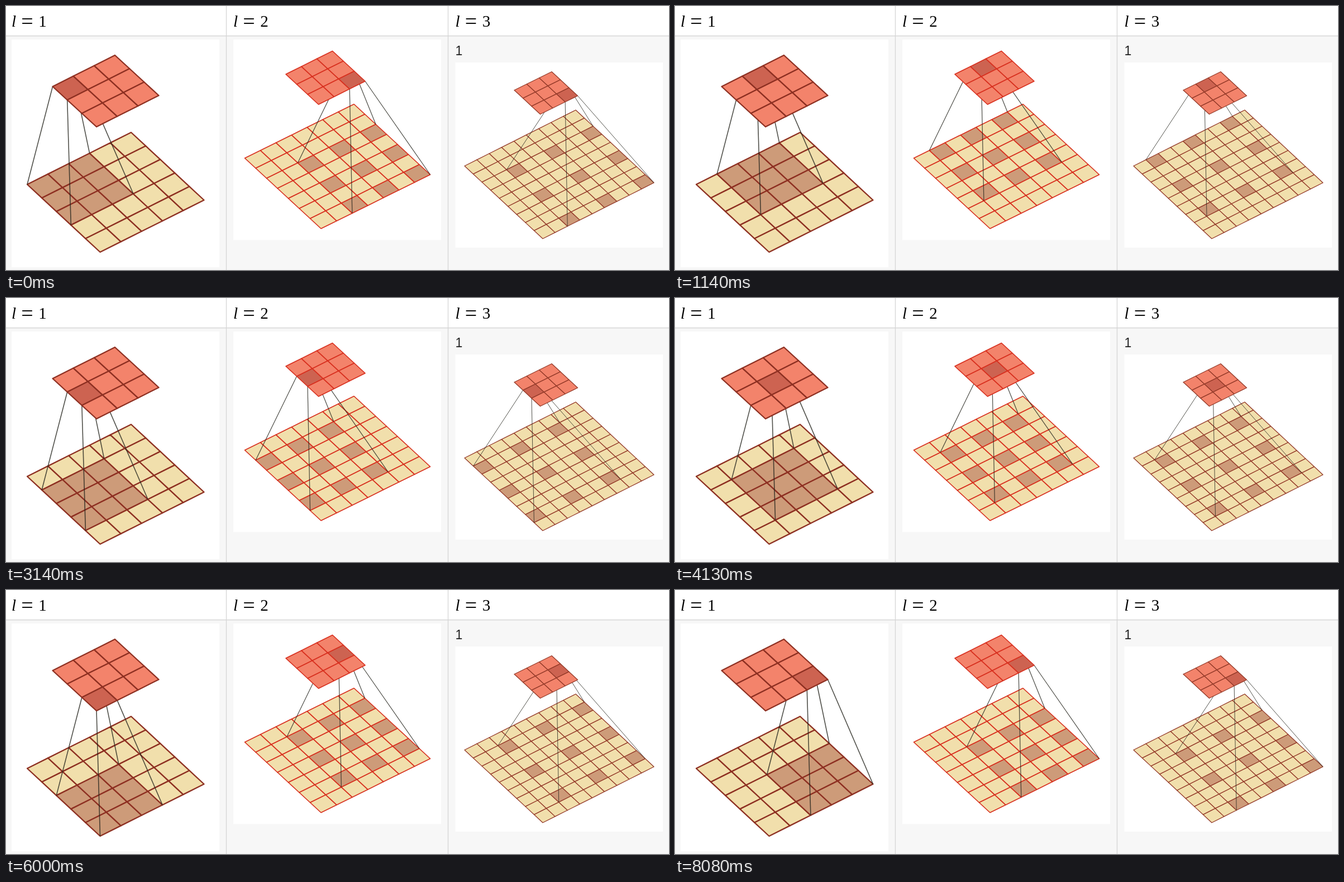
Recreate the animation shown at these times as an HTML page. Size 1187 by 472 pixels, loop 9.01 s.

```html
<!DOCTYPE html>
<html lang="en">
<head>
<meta charset="utf-8">
<title>Dilated convolutions</title>
<style>
  html, body { margin: 0; width: 100%; height: 100%; overflow: hidden; background: #f7f7f7; }
  svg { display: block; width: 100%; height: 100%; }
  .math { font: 29px "Liberation Serif", serif; text-anchor: middle; }
  .letter { font-style: italic; }
  .equals { font-size: 38px; }
  .note { font: 23px "Liberation Sans", sans-serif; fill: #222; }
  .rule { stroke: #d5d5d5; stroke-width: 1.3; }
  .ray { stroke: #26261f; stroke-opacity: .8; }
</style>
</head>
<body>
<svg id="stage" viewBox="0 0 1187 472"></svg>
<script>
const LOOP = 9010;
const COLORS = { base: '#f1dfac', patch: '#cd9b79', top: '#f3836b', active: '#cd6351' };

// Planes are given by their left, top and bottom corners.
const panels = [
  {
    dilation: 1, x: 10, card: [10, 60, 372, 407],
    base: [[38, 319], [224, 226], [168.5, 440]],
    top: [[83.5, 144], [195, 88], [162, 216]],
    edge: '#8e3022', edgeWidth: 2.3, rayWidth: 1.6,
    starts: [0, 1000, 2000, 3000, 4000, 5000, 6000, 7000, 8010]
  },
  {
    dilation: 2, x: 407, card: [407, 60, 372, 358.5],
    base: [[427.5, 272], [623, 175.5], [564, 398]],
    top: [[501, 122], [584.5, 80.5], [559.5, 176]],
    edge: '#d8301f', edgeWidth: 1.7, rayWidth: 1.25,
    starts: [70, 1070, 2070, 3070, 4070, 5070, 6070, 7070, 8080]
  },
  {
    dilation: 3, x: 804.5, card: [804.5, 101, 371.5, 331],
    base: [[821, 286], [1020, 186], [961, 416]],
    top: [[910, 150.5], [977, 117.5], [956.5, 193.5]],
    edge: '#943a29', edgeWidth: 1.3, rayWidth: 1,
    starts: [140, 1140, 2130, 3140, 4130, 5070, 6070, 7070, 8080]
  }
];

function gridPoint([origin, uEnd, vEnd], size, col, row) {
  return [0, 1].map(k => origin[k]
    + (uEnd[k] - origin[k]) * col / size
    + (vEnd[k] - origin[k]) * row / size);
}

function corners(plane, size, col, row, span) {
  return [[0, 0], [span, 0], [span, span], [0, span]]
    .map(([dc, dr]) => gridPoint(plane, size, col + dc, row + dr));
}

function grid(plane, size, fillFor) {
  let cells = '';
  for (let row = 0; row < size; row++) {
    for (let col = 0; col < size; col++) {
      cells += `<polygon points="${corners(plane, size, col, row, 1).join(' ')}" fill="${fillFor(col, row)}"/>`;
    }
  }
  return cells;
}

function drawPanel({ dilation, base, top, edge, edgeWidth, rayWidth }, step) {
  const col = step % 3, row = Math.floor(step / 3);
  const size = 2 * dilation + 3, span = 2 * dilation + 1;
  const sampled = (i, start) => i >= start && i < start + span && (i - start) % dilation === 0;

  const baseCells = grid(base, size, (c, r) =>
    sampled(c, col) && sampled(r, row) ? COLORS.patch : COLORS.base);
  const topCells = grid(top, 3, (c, r) =>
    c === col && r === row ? COLORS.active : COLORS.top);

  const ends = corners(base, size, col, row, span);
  const rays = corners(top, 3, col, row, 1).map(([x, y], i) =>
    `<line class="ray" stroke-width="${rayWidth}" x1="${x}" y1="${y}" x2="${ends[i][0]}" y2="${ends[i][1]}"/>`).join('');

  return `<g stroke="${edge}" stroke-width="${edgeWidth}" stroke-linejoin="round">${baseCells}${rays}${topCells}</g>`;
}

function drawFrame() {
  const cards = panels.map(({ dilation, x, card: [left, y, w, h] }) => `
    <text class="math letter" x="${x + 4}" y="36.5">l</text>
    <text class="math equals" x="${x + 28}" y="39.5">=</text>
    <text class="math" x="${x + 55.5}" y="36.5">${dilation}</text>
    <rect x="${left}" y="${y}" width="${w}" height="${h}" fill="#fff"/>
    <g id="panel${dilation}"></g>`).join('');
  return `
    <rect width="1187" height="472" fill="#f7f7f7"/>
    <rect width="1187" height="53" fill="#fff"/>
    <path class="rule" d="M0 53.5H1187M394.5 0V472M791.5 0V472"/>
    ${cards}
    <text class="note" x="804.5" y="88">1</text>`;
}

document.getElementById('stage').innerHTML = drawFrame();

function render(now) {
  const time = now % LOOP;
  for (const panel of panels) {
    // Before its first start, a panel still shows the last step of the previous loop.
    const started = panel.starts.filter(start => start <= time).length;
    const step = (started + 8) % 9;
    if (step !== panel.step) {
      panel.step = step;
      document.getElementById('panel' + panel.dilation).innerHTML = drawPanel(panel, step);
    }
  }
  requestAnimationFrame(render);
}
render(performance.now());
</script>
</body>
</html>
```
